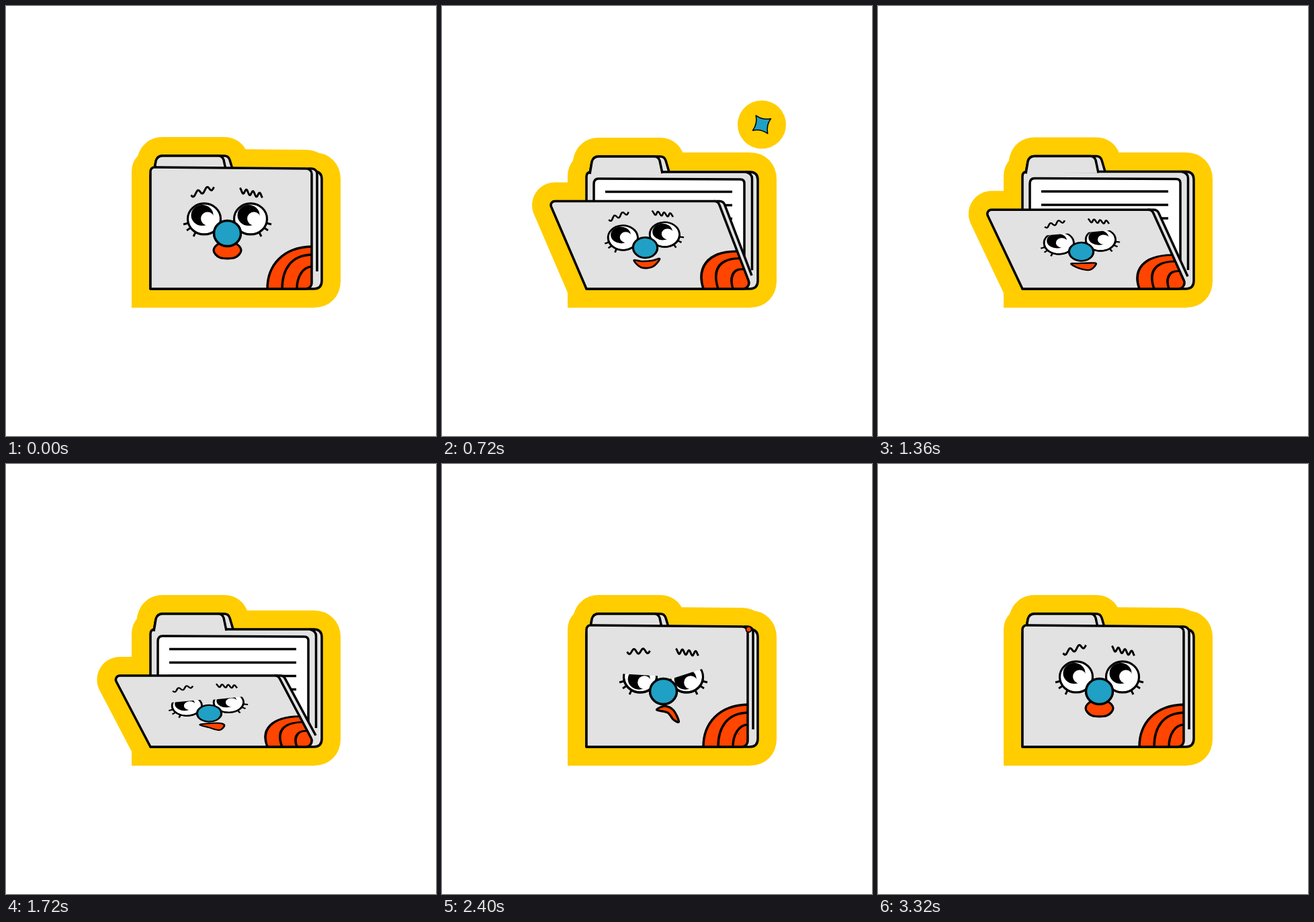
Recreate the animation shown at these times as an HTML page with a canvas. Size 640 px wide and 640 px high, loop 3.48 s.

```html
<!DOCTYPE html>
<html lang="en">
<head>
<meta charset="utf-8">
<title>Folder</title>
<style>
html, body { margin: 0; width: 100%; height: 100%; overflow: hidden; background: #fff; }
canvas { display: block; }
</style>
</head>
<body>
<canvas id="stage" width="640" height="640"></canvas>
<script>
const ctx = document.getElementById('stage').getContext('2d');
const LOOP = 3480, TAU = Math.PI * 2;
const YELLOW = '#ffcd00', GREY = '#e2e2e2', BLUE = '#20a0c4', ORANGE = '#ff4500';

// cover left x, top y, right x, body drop | lid ends (left eye, right eye) | pupil x, y | brow tilt | mouth points
const POSES = {
  shy:    [215, 240, 455, 0,  -28, -28, -28, -28,  0, 0,  1,
           -20.5, 25, -11, 14.5, 11, 14.5, 20.5, 25, 11, 36, -11, 36],
  asleep: [158, 337, 405, 2,  27, 27, 27, 27,  0, 0,  0.2,
           -21, 22, -11, 19, 10, 20, 21, 22, 10, 36, -11, 36],
  happy:  [159, 288, 411, 1,  -28, -28, -28, -28,  0, 0,  1,
           -21, 22, -9, 25, 8, 25.4, 21.4, 23, 7.4, 37, -11, 36],
  doubt:  [159.5, 315, 405, 0,  -10, -11, -9, -11,  0, 1,  0.6,
           -18, 24.4, -5.4, 22.7, 14.5, 24, 21.7, 30, 12.7, 40, -4.3, 32],
  cross:  [215, 240, 455, 0,  -7.5, -7, 1, -15,  2, 7,  0,
           -10, 27.5, 2, 22, 15, 28, 23, 45, 15, 42, 6, 31.5],
  glum:   [215, 240, 455, 0,  -1, 6, 9, -11,  0, 11,  0,
           -10, 27.5, 2, 22, 15, 28, 23, 45, 15, 42, 6, 31.5]
};
const SCRIPT = [
  [0, 'shy'], [80, 'shy'], [420, 'asleep'], [460, 'asleep'], [760, 'happy'], [1120, 'happy'],
  [1560, 'doubt'], [1740, 'doubt'], [2000, 'cross'], [2240, 'cross'],
  [2600, 'glum'], [2880, 'glum'], [3280, 'shy'], [LOOP, 'shy']
];

// times: appear, full, start to shrink, gone; places: from, full, to
const BITS = [
  { times: [100, 260, 320, 560], path: [[205, 265], [174, 175], [205, 265]] },
  { star: 1, turn: -33, times: [412, 572, 640, 860], path: [[469.2, 196.3], [479, 168], [469, 196]] },
  { star: 1, turn: 12, times: [700, 860, 960, 1168], path: [[251, 342], [204, 450], [251, 342]] },
  { times: [2005, 2165, 2260, 2480], path: [[348, 201], [518, 214], [430, 260]] },
  { times: [2380, 2540, 2580, 2780], path: [[440, 400], [478, 443], [440, 400]] },
  { star: 1, turn: -33, times: [2560, 2720, 2820, 3060], path: [[225, 270], [183, 206], [225, 270]] }
];

const mix = (a, b, k) => a + (b - a) * k;
const ease = (t, a, b) => {
  const k = Math.min(1, Math.max(0, (t - a) / (b - a)));
  return k * k * (3 - 2 * k);
};

function poseAt(t) {
  const i = SCRIPT.findIndex((s, n) => n && t < s[0]);
  const [t0, from] = SCRIPT[i - 1], [t1, to] = SCRIPT[i];
  const k = ease(t, t0, t1);
  return POSES[from].map((v, n) => mix(v, POSES[to][n], k));
}

function paint(path, fill, width = 3.5, line = '#000') {
  if (fill) { ctx.fillStyle = fill; ctx.fill(path); }
  if (width) { ctx.lineWidth = width; ctx.strokeStyle = line; ctx.stroke(path); }
}

function disc(x, y, rx, ry, fill, width) {
  const p = new Path2D();
  p.ellipse(x, y, rx, ry, 0, 0, TAU);
  paint(p, fill, width);
}

function segment(x0, y0, x1, y1, width) {
  paint(new Path2D(`M${x0} ${y0}L${x1} ${y1}`), null, width);
}

const body = new Path2D('M215 421V253Q215 246 222 246H458Q470 246 470 258V409Q470 421 458 421Z');
const backTab = new Path2D('M220 248L223 231Q225 223 233 223H325Q331 223 333 229L338 246');
const frontTab = new Path2D('M220 249L223 231Q225 223 233 223H316Q322 223 324 229L328 248');
const bodyEdge = new Path2D('M452 246Q461.5 248 461.5 256V393');
const page = new Path2D('M226 410V264Q226 256 233 256L444 257Q450 257 450 263V410');
const arcs = [
  'M389 0C389 -35 412 -62 455 -63H475',
  'M411 0C411 -30 425 -50 455 -51H475',
  'M433 0C433 -18 442 -33 455 -33H475'
];

// The cover outline, and its outer edge that shows the thickness
function coverShapes([tx, ty, rx], open) {
  const top = ty + 2 * (1 - open), right = 455 + 6 * open;
  const front = new Path2D();
  front.moveTo(215, 421);
  front.arcTo(tx, ty, rx, top, 6);
  front.arcTo(rx, top, right, 421, 8);
  front.arcTo(right, 421, 215, 421, 9);
  front.closePath();
  const endX = 463 - 2 * open, endY = 395 + (ty - 240) * 0.12;
  const edge = new Path2D();
  edge.moveTo(rx - 6, top);
  edge.arcTo(rx + 8, top, endX, endY, 8);
  edge.lineTo(endX, endY);
  const side = new Path2D(edge);
  side.lineTo(455, 416);
  return { front, edge, side };
}

function drawBack(drop) {
  ctx.save();
  ctx.translate(0, drop);
  paint(backTab, GREY);
  ctx.restore();
  ctx.save();
  // The bottom edge stays put while the top drops
  const k = (421 - 246 - drop) / 175;
  ctx.transform(1, 0, 0, k, 0, 421 * (1 - k));
  paint(body, GREY);
  paint(bodyEdge);
  ctx.restore();
  ctx.save();
  ctx.translate(0, drop);
  paint(frontTab, GREY);
  paint(page, '#fff');
  for (let i = 0; i < 5; i++) segment(243, 275.5 + i * 20, 432, 275.5 + i * 20, 3.5);
  ctx.restore();
}

function drawCover(cover, open, tall) {
  paint(cover.side, GREY, 0);
  paint(cover.edge);
  paint(cover.front, GREY, 0);
  ctx.save();
  ctx.clip(cover.front);
  ctx.transform(1, 0, 0.286 * open, tall * (1 + 0.23 * open), 0, 421);
  paint(new Path2D(arcs[0] + 'V0Z'), ORANGE, 0);
  arcs.forEach(a => paint(new Path2D(a)));
  ctx.restore();
  paint(cover.front);
}

function drawEye(side, lid0, lid1, px, py) {
  ctx.save();
  ctx.translate(34.5 * side, -21.5);
  disc(0, 0, 24.5, 23, '#fff', 0);
  ctx.save();
  const inside = new Path2D();
  inside.ellipse(0, 0, 24.5, 23, 0, 0, TAU);
  ctx.clip(inside);
  disc(px - 3, py - 5.5, 16.5, 15.5, '#000', 0);
  disc(px + 5, py - 0.5, 10, 10, '#fff', 0);
  ctx.restore();
  disc(0, 0, 24.5, 23, null, 3.2);
  if (lid0 > -27) {
    paint(new Path2D(`M-27 -27H27V${lid1}L-27 ${lid0}Z`), GREY, 0);
    // Only the part of the rim below the lid stays visible
    const rim = new Path2D();
    rim.ellipse(0, 0, 24.5, 23, 0, 0.12, Math.PI - 0.12);
    paint(rim, null, 3.2);
  }
  [[31, 8, 23, 6], [26, 17, 20, 13], [16, 26, 13, 20]].forEach(([a, b, c, d]) =>
    segment(a * side, b, c * side, d, 3));
  ctx.restore();
}

function drawBrow(x0, y0, x1, y1, wave) {
  const p = new Path2D();
  for (let i = 0; i <= 40; i++) {
    const k = i / 40;
    p.lineTo(mix(x0, x1, k), mix(y0, y1, k) + 3.6 * wave(k));
  }
  paint(p, null, 3);
}

// Closed smooth curve through the points
function drawMouth(m) {
  const n = m.length / 2, at = i => [m[(i + n) % n * 2], m[(i + n) % n * 2 + 1]];
  const p = new Path2D();
  p.moveTo(...at(0));
  for (let i = 0; i < n; i++) {
    const [a, b, c, d] = [at(i - 1), at(i), at(i + 1), at(i + 2)];
    p.bezierCurveTo(b[0] + (c[0] - a[0]) / 6, b[1] + (c[1] - a[1]) / 6,
      c[0] - (d[0] - b[0]) / 6, c[1] - (d[1] - b[1]) / 6, c[0], c[1]);
  }
  paint(p, ORANGE, 3.2);
}

function drawFace(pose, open, tall) {
  const [l0, l1, r0, r1, px, py, tilt, ...mouth] = pose.slice(4);
  ctx.save();
  ctx.transform(1 - 0.1 * open, -0.07 * open, 0.1 * open, tall * (1 + 0.1 * open),
    329.5 - 27 * open, 421 - 181 * tall * 0.456 * (1 + 0.03 * open));
  drawEye(-1, l0, l1, px, py);
  drawEye(1, r0, r1, px, py);
  drawBrow(-54, mix(-59, -57, tilt), -20, mix(-60.5, -69, tilt), k => Math.sin(TAU * 2.5 * k));
  drawBrow(18.5, mix(-60, -64, tilt), 52, mix(-56, -56, tilt), k => -Math.cos(TAU * 3.4 * k));
  drawMouth(mouth);
  disc(0, 0, 20, 19, BLUE, 3.5);
  ctx.restore();
}

function placeBit({ times: [a, b, c, d], path }, t) {
  const grow = ease(t, a, b), fade = ease(t, c, d);
  const [from, full, to] = path;
  const along = n => mix(mix(from[n], full[n], grow), to[n], fade);
  return { x: along(0), y: along(1), size: grow * (1 - fade) };
}

function drawBit(bit, { x, y, size }) {
  ctx.save();
  ctx.translate(x, y);
  ctx.scale(size, size);
  if (bit.star) {
    ctx.rotate(bit.turn * Math.PI / 180);
    const p = new Path2D('M23 0');
    for (let i = 1; i <= 4; i++) {
      const end = i * TAU / 4, mid = end - TAU / 8;
      p.quadraticCurveTo(9 * Math.cos(mid), 9 * Math.sin(mid), 23 * Math.cos(end), 23 * Math.sin(end));
    }
    p.closePath();
    paint(p, BLUE, 2.2);
  } else {
    disc(0, 0, 13.5, 13.5, ORANGE, 6);
  }
  ctx.restore();
}

function draw(t) {
  const pose = poseAt(t);
  const open = Math.min(1, (215 - pose[0]) / 55.5);
  const tall = (421 - pose[1]) / 181;
  const cover = coverShapes(pose, open);
  const bits = BITS.map(b => [b, placeBit(b, t)]).filter(([, p]) => p.size > 0.01);

  ctx.fillStyle = '#fff';
  ctx.fillRect(0, 0, 640, 640);
  ctx.lineJoin = 'round';
  ctx.lineCap = 'butt';

  bits.forEach(([, p]) => disc(p.x, p.y, 51.5 * p.size, 51.5 * p.size, YELLOW, 0));
  ctx.save();
  ctx.translate(0, pose[3]);
  paint(backTab, YELLOW, 56, YELLOW);
  ctx.restore();
  paint(body, YELLOW, 56, YELLOW);
  paint(cover.front, YELLOW, 56, YELLOW);
  ctx.fillStyle = YELLOW;
  ctx.fillRect(187, 421, 40, 28);

  drawBack(pose[3]);
  drawCover(cover, open, tall);
  drawFace(pose, open, tall);
  bits.forEach(([b, p]) => drawBit(b, p));
}

const start = performance.now();
function tick() {
  const t = (performance.now() - start) % LOOP;
  draw(Math.floor(t / 40) * 40);
  requestAnimationFrame(tick);
}
tick();
</script>
</body>
</html>
```
